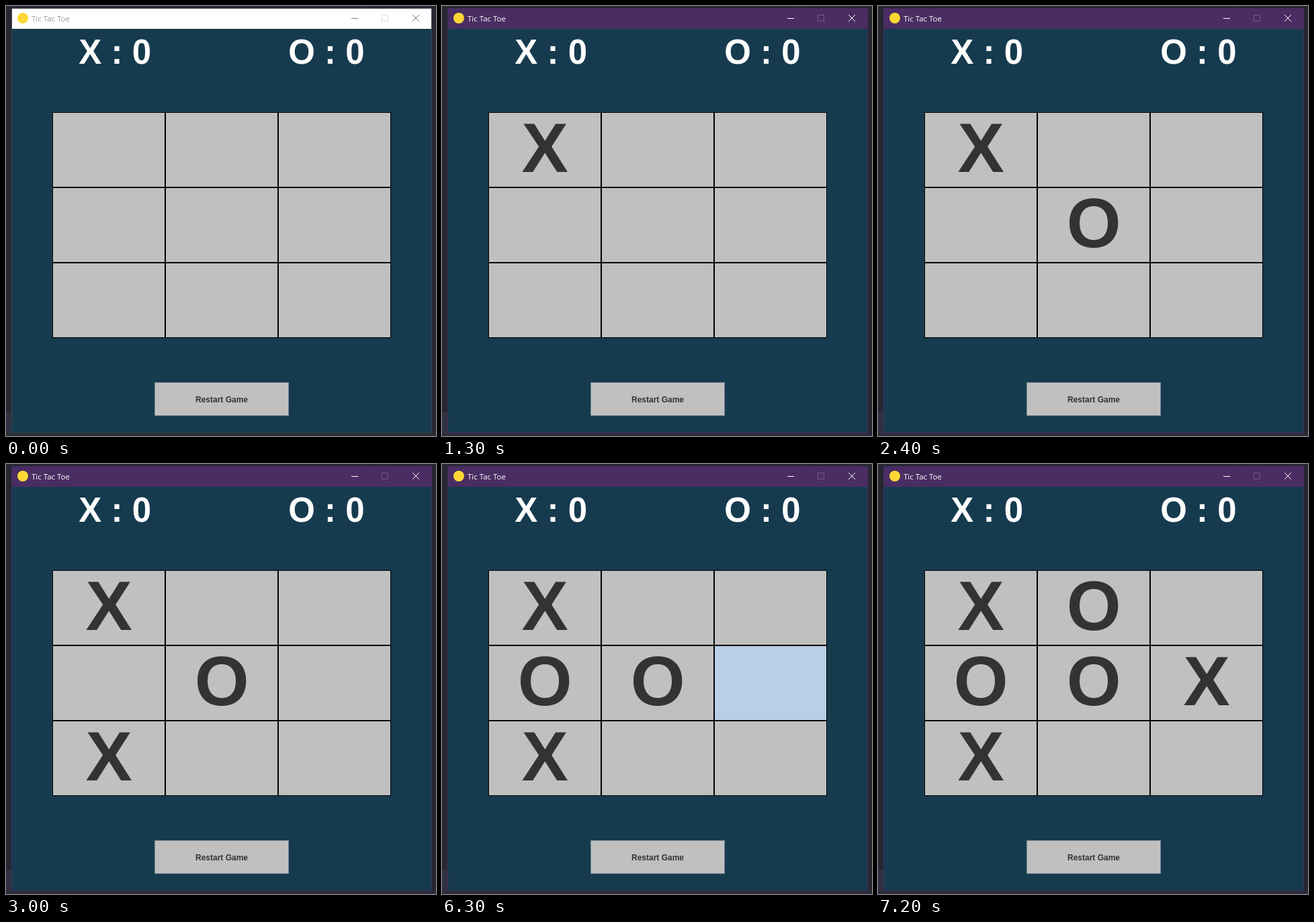
Write an HTML page that moves like this. It is 640x640 px and loops after 8 s.

```html
<!DOCTYPE html>
<html lang="en">
<head>
<meta charset="utf-8">
<title>Tic Tac Toe</title>
<style>
  html, body { margin: 0; width: 100%; height: 100%; overflow: hidden; background: #262731; }
  svg { display: block; width: 100vw; height: 100vh; }
  text { white-space: pre; }
  .bold { font-family: "Liberation Sans", Arial, sans-serif; font-weight: bold; }
  .title { font-family: "Open Sans", "Noto Sans", sans-serif; font-size: 11.5px; }
  .score { font-size: 51px; fill: #fff; }
  .mark { font-size: 104px; fill: #333; text-anchor: middle; }
  .label { font-size: 12px; fill: #333; text-anchor: middle; }
</style>
</head>
<body>
<svg id="stage" viewBox="0 0 640 640">
  <rect width="640" height="640" fill="#262731"/>
  <rect x="533" width="1" height="3" fill="#3a3b46"/>
  <rect y="604" width="8" height="36" fill="#2f3240"/>
  <rect y="636" width="640" height="4" fill="#2b2d39"/>
  <rect id="frame" x="8" y="3" width="626" height="633"/>
  <rect x="9" y="34" width="624" height="601" fill="#163b4e"/>
  <rect id="bar" x="9" y="4" width="624" height="30"/>
  <circle cx="25" cy="18" r="8" fill="#fdd835"/>
  <text id="title" class="title" x="38" y="23">Tic Tac Toe</text>
  <g fill="none">
    <path id="tools" d="M514 18.5h10M605 13l10 10M615 13l-10 10"/>
    <rect id="max" x="559.5" y="13.5" width="9" height="9"/>
  </g>
  <text class="bold score" x="108.3" y="86">X : 0</text>
  <text class="bold score" x="420.2" y="86">O : 0</text>
  <rect x="69" y="158" width="504" height="336"/>
  <g id="board"></g>
  <rect x="221.5" y="560.5" width="199" height="49" fill="#c0c0c0" stroke="#7a8a99"/>
  <text class="bold label" x="321" y="590">Restart Game</text>
</svg>
<script>
  const LOOP = 8000, PRESS = 100;
  // [press time, cell index]; X and O alternate
  const moves = [[1200, 0], [2300, 4], [2900, 6], [5200, 3], [6300, 5], [7100, 1]];
  const $ = id => document.getElementById(id);

  function add(tag, attrs) {
    const el = document.createElementNS("http://www.w3.org/2000/svg", tag);
    for (const k in attrs) el.setAttribute(k, attrs[k]);
    return $("board").appendChild(el);
  }

  const cells = Array.from({ length: 9 }, (_, i) => {
    const x = 70 + (i % 3) * 168, y = 159 + Math.floor(i / 3) * 112;
    return {
      box: add("rect", { x, y, width: 166, height: 110 }),
      mark: add("text", { class: "bold mark", x: x + 83.3, y: y + 88 })
    };
  });

  function draw(t) {
    const active = t >= moves[0][0];
    $("frame").setAttribute("fill", active ? "#472c5f" : "#39434f");
    $("bar").setAttribute("fill", active ? "#4a2d62" : "#fff");
    $("title").setAttribute("fill", active ? "#fff" : "#999");
    $("tools").setAttribute("stroke", active ? "#fff" : "#777");
    $("max").setAttribute("stroke", active ? "#735c86" : "#ddd");

    cells.forEach((cell, i) => {
      const n = moves.findIndex(m => m[1] === i);
      const age = n < 0 ? -1 : t - moves[n][0];
      cell.box.setAttribute("fill", age >= 0 && age < PRESS ? "#b8cfe5" : "#c0c0c0");
      cell.mark.textContent = age >= PRESS ? "XO"[n % 2] : "";
    });
  }

  const start = performance.now();
  function tick() {
    draw((performance.now() - start) % LOOP);
    requestAnimationFrame(tick);
  }
  tick();
</script>
</body>
</html>
```
